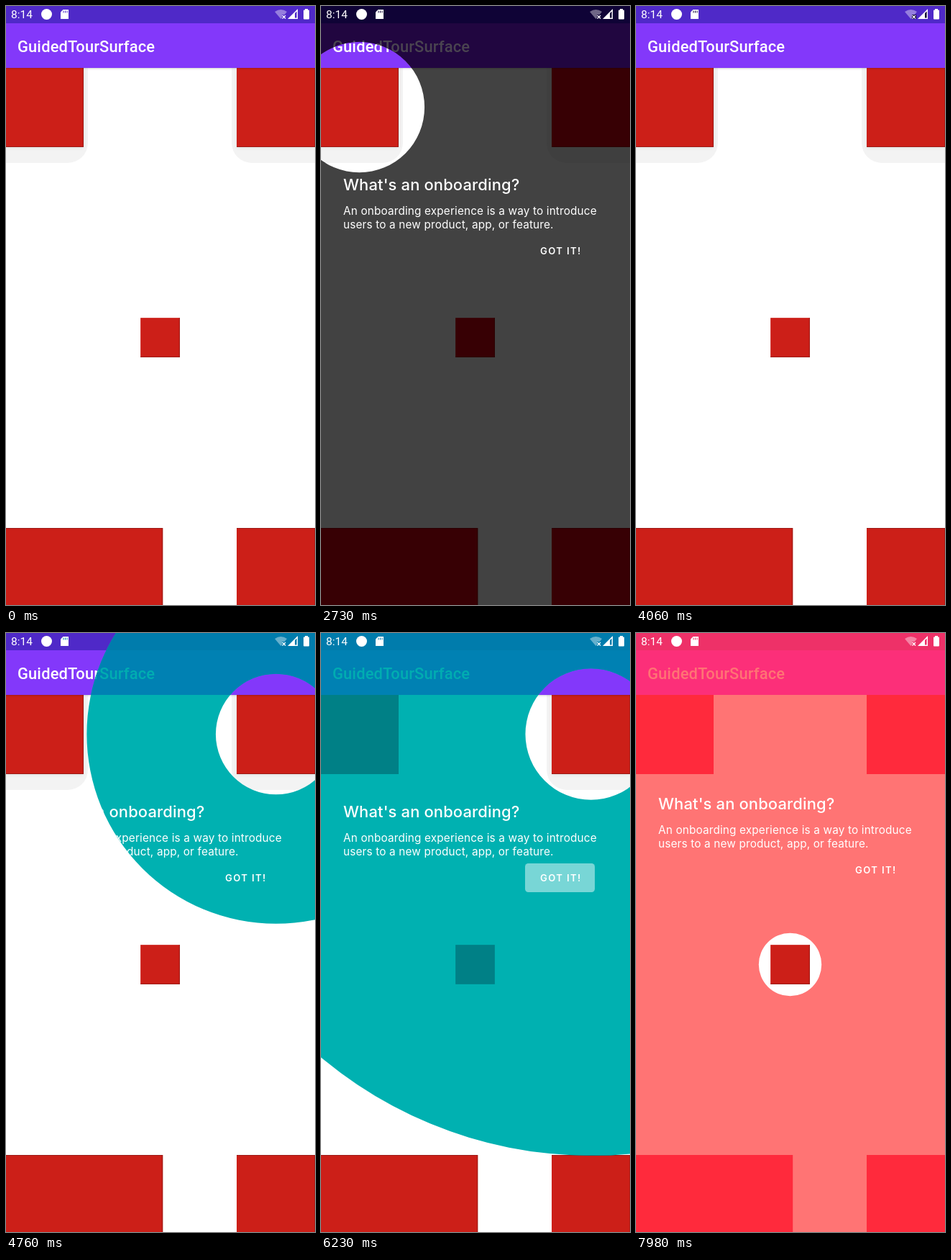
An HTML page with a canvas for the animation above (8 s loop, 430 px wide and 832 px high).

```html
<!DOCTYPE html>
<html lang="en">
<head>
<meta charset="utf-8">
<title>Guided tour</title>
<style>
  html, body { margin: 0; width: 100%; height: 100%; overflow: hidden; background: #fff; }
  canvas { display: block; }
</style>
</head>
<body>
<canvas id="stage" width="430" height="832"></canvas>
<script>
const W = 430, H = 832, LOOP = 8000, MOVE = 500, PULSE = 1100;
const BIG = 109.4, SMALL = 54.7;
const ctx = document.getElementById('stage').getContext('2d');

const LIGHT = { status: '#4f29c8', bar: '#8338fa', title: '#fff', bg: '#fff', box: '#cc1f18', shadow: '#f3f3f3', edge: '#9c1915' };
const DARK = { status: '#0f0336', bar: '#210640', title: '#4a4450', bg: '#424242', box: '#370004', shadow: '#3f3f3f', edge: '#2a0003' };
const TEAL = { status: '#007cac', bar: '#0081b3', title: '#00adb1', bg: '#00b1b1', box: '#008086' };
const CORAL = { status: '#ee3168', bar: '#fc2f79', title: '#ff7474', bg: '#ff7474', box: '#ff2a3c' };

// Each step opens a coloured overlay around its target and closes it again.
const STEPS = [
  { open: 2090, press: 3610, close: 3744.5, x: 53.3, y: 140.5, size: BIG, dy: 0, look: DARK },
  { open: 4616, press: 5967, close: 6101, x: 375.7, y: 140.5, size: BIG, dy: 0, look: TEAL },
  { open: 6860, press: 9000, close: 9000, x: 214.5, y: 460.5, size: SMALL, dy: -11, look: CORAL }
];

const clamp = v => Math.max(0, Math.min(1, v));

// cubic-bezier(.4, 0, .2, 1)
function ease(x) {
  let lo = 0, hi = 1;
  for (let i = 0; i < 24; i++) {
    const s = (lo + hi) / 2, q = 1 - s;
    if (1.2 * q * q * s + 0.6 * q * s * s + s ** 3 < x) lo = s; else hi = s;
  }
  return lo * lo * (3 - 2 * lo);
}

function rect(color, x, y, w, h) {
  ctx.fillStyle = color;
  ctx.fillRect(x, y, w, h);
}

function shape(color, build) {
  ctx.fillStyle = color;
  ctx.beginPath();
  build();
  ctx.fill();
}

function poly(color, ...points) {
  shape(color, () => points.forEach(([x, y]) => ctx.lineTo(x, y)));
}

function text(str, x, y, font, color = '#fff', spacing = 0) {
  ctx.font = font;
  ctx.letterSpacing = spacing + 'px';
  ctx.fillStyle = color;
  ctx.fillText(str, x, y);
}

function box(c, x, y, w, h) {
  rect(c.box, x, y, w, h);
  if (!c.edge) return;
  rect(c.edge, x, y + h - 1, w, 1);
  rect(c.edge, x + w - 1, y, 1, h);
}

function screen(c) {
  rect(c.bg, 0, 0, W, H);
  if (c.shadow) {
    shape(c.shadow, () => {
      ctx.roundRect(-40, 60, 154, 158, 28);
      ctx.roundRect(314, 60, 154, 158, 28);
    });
  }
  ctx.save();
  if (c === LIGHT) {
    ctx.shadowColor = 'rgba(0,0,0,.1)';
    ctx.shadowBlur = 5;
    ctx.shadowOffsetY = 2;
  }
  rect(c.box, -1.4, 86, BIG, BIG);
  rect(c.box, 321, 86, BIG, BIG);
  ctx.restore();
  box(c, -1.4, 86, BIG, 110);
  box(c, 321, 86, BIG, 110);
  box(c, 187.15, 433.15, SMALL, SMALL);
  box(c, -1.4, 725, 219.6, BIG);
  box(c, 321, 725, BIG, BIG);
  if (c.edge) {
    rect(c.edge, 0, 725, 218, 1);
    rect(c.edge, 321, 725, BIG, 1);
    rect('rgba(0,0,0,.15)', 0, 86, W, 1);
    rect('rgba(0,0,0,.04)', 0, 87, W, 2);
  }
  rect(c.bar, 0, 24, W, 62);
  rect(c.status, 0, 0, W, 24);
  text('GuidedTourSurface', 16, 64, '500 21.9px Roboto, sans-serif', c.title, 0.15);
}

function statusIcons(c) {
  text('8:14', 7, 17, '15.5px Roboto, sans-serif');
  shape('#fff', () => ctx.arc(56.5, 11.5, 7.5, 0, 7));
  poly('#fff', [79.5, 5], [87, 5], [87, 18], [76, 18], [76, 8.5]);
  for (const x of [79.5, 82, 84.5]) rect(c.status, x, 6.5, 1, 3);
  shape('rgba(255,255,255,.4)', () => {
    ctx.moveTo(382.5, 18);
    ctx.lineTo(374, 8);
    ctx.quadraticCurveTo(382.5, 2, 391, 8);
  });
  rect(c.status, 384, 12, 6, 6);
  ctx.strokeStyle = '#fff';
  ctx.lineWidth = 1.3;
  ctx.beginPath();
  ctx.moveTo(384.5, 13); ctx.lineTo(389, 17.5);
  ctx.moveTo(389, 13); ctx.lineTo(384.5, 17.5);
  ctx.stroke();
  poly('#fff', [392, 18], [406, 4], [406, 18]);
  poly(c.status, [402, 10], [404.6, 7.4], [404.6, 16.6], [402, 16.6]);
  shape('#fff', () => {
    ctx.roundRect(414, 5.5, 8, 13, 1);
    ctx.rect(416, 4, 4, 2);
  });
}

function message(step, t) {
  const pressed = clamp((t - step.press) / 200);
  ctx.save();
  ctx.translate(0, step.dy);
  if (pressed > 0) {
    ctx.save();
    ctx.beginPath();
    ctx.roundRect(284, 320, 97, 40, 4.5);
    ctx.clip();
    shape('rgba(255,255,255,.47)', () => ctx.arc(332.5, 340, 56 * pressed, 0, 7));
    ctx.restore();
  }
  const body = '15.3px Inter, sans-serif';
  text("What's an onboarding?", 31, 256, '500 21.9px Inter, sans-serif', '#fff', 0.16);
  text('An onboarding experience is a way to introduce', 31, 290, body, '#fff', 0.17);
  text('users to a new product, app, or feature.', 31, 308.5, body, '#fff', 0.17);
  text('GOT IT!', 305, 345, '600 13.1px Inter, sans-serif', '#fff', 1.37);
  ctx.restore();
}

function overlay(step, t) {
  const { x, y } = step;
  const full = Math.hypot(Math.max(x, W - x), Math.max(y, H - y));
  const reach = ease(clamp((t - step.open) / MOVE)) - ease(clamp((t - step.close) / MOVE));
  const outer = full * reach;
  const wave = (1 - Math.cos((t - step.open) / PULSE * 2 * Math.PI)) / 2;
  const hole = step.size / Math.SQRT2 + 5 + 9 * wave;
  if (outer <= hole) return;
  ctx.save();
  ctx.beginPath();
  ctx.arc(x, y, outer + (reach > 0.999 ? 2 : 0), 0, 2 * Math.PI);
  ctx.closePath();
  ctx.moveTo(x + hole, y);
  ctx.arc(x, y, hole, 0, 2 * Math.PI);
  ctx.clip('evenodd');
  screen(step.look);
  message(step, t);
  ctx.restore();
}

function draw(now) {
  const t = now % LOOP;
  const step = STEPS.find(s => t >= s.open && t < s.close + MOVE);
  screen(LIGHT);
  if (step) overlay(step, t);
  statusIcons(step ? step.look : LIGHT);
}

let start;
function tick(now) {
  start ??= now;
  draw(now - start);
  requestAnimationFrame(tick);
}
draw(0);
requestAnimationFrame(tick);
</script>
</body>
</html>
```
